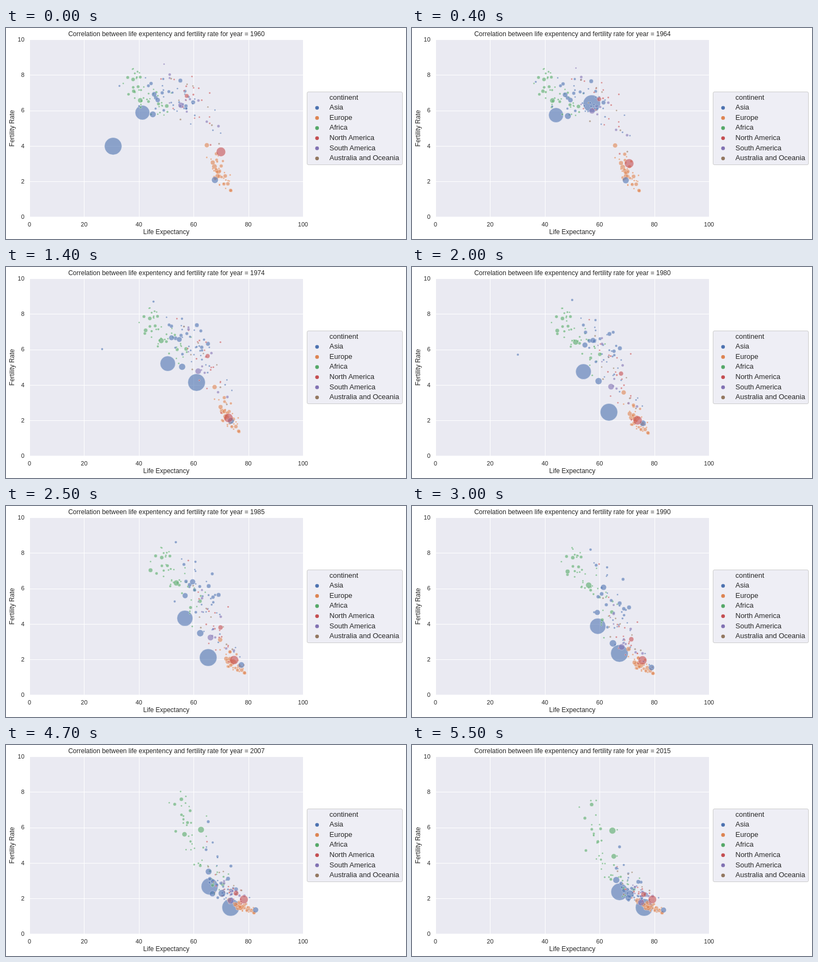
Recreate the animation shown at these times as an HTML page. Size 734x388 px, loop 5600 ms.

```html
<!DOCTYPE html>
<html lang="en">
<head>
<meta charset="utf-8">
<title>Life expectancy and fertility</title>
<style>
  html, body { margin: 0; width: 100%; height: 100%; overflow: hidden; background: #fff; }
  svg { display: block; width: 734px; height: 388px; }
  text { font-family: "Liberation Sans", Arial, sans-serif; fill: #262626; }
</style>
</head>
<body>
<svg id="chart" viewBox="0 0 734 388" xmlns="http://www.w3.org/2000/svg"></svg>
<script>
const chart = document.getElementById('chart');
const YEAR_MS = 100, FIRST = 1960, YEARS = 56;
const COLORS = {
  'Asia': '#4c72b0', 'Europe': '#dd8452', 'Africa': '#55a868',
  'North America': '#c44e52', 'South America': '#8172b3', 'Australia and Oceania': '#937860'
};
const [ASIA, EUROPE, AFRICA, NORTH, SOUTH, OCEANIA] = Object.values(COLORS);

const px = life => 43.5 + 5.02 * life;
const py = fert => 347.6 - 32.6 * fert;

function add(name, attrs, parent = chart) {
  const el = document.createElementNS('http://www.w3.org/2000/svg', name);
  for (const k in attrs) el.setAttribute(k, attrs[k]);
  parent.appendChild(el);
  return el;
}

function label(str, x, y, size, anchor = 'middle', extra = {}) {
  const el = add('text', { x, y, 'font-size': size, 'text-anchor': anchor, ...extra });
  el.textContent = str;
  return el;
}

// Axes
add('rect', { x: 43, y: 21.5, width: 502, height: 326, fill: '#eaeaf2' });
for (let i = 0; i <= 5; i++) {
  const x = px(i * 20), y = py(i * 2);
  const gx = Math.floor(x) + 0.5, gy = Math.floor(y) + 0.5;
  add('path', { d: `M${gx} 21.5V347.5M43 ${gy}H545`, stroke: '#fff' });
  label(i * 20, x - 0.5, 364.5, 11);
  label(i * 2, 33.8, y + 3.3, 11, 'end');
}
label('Life Expectancy', 294.2, 378.8, 12);
label('Fertility Rate', 0, 0, 12, 'middle', { transform: 'translate(15 184.5) rotate(-90)' });
const title = label('', 294.4, 15, 12);

const plot = add('g', { 'fill-opacity': 0.6, stroke: '#fff', 'stroke-width': 0.5, 'stroke-opacity': 0.7 });

// Legend
add('rect', { x: 552.5, y: 117.5, width: 175, height: 134, rx: 2.5, fill: '#eeeef5', stroke: '#ccc' });
label('continent', 593.5, 131.7, 13, 'start');
Object.entries(COLORS).forEach(([name, fill], i) => {
  const y = 146.4 + i * 18.6;
  add('circle', { cx: 570.8, cy: y + 0.4, r: 3.4, fill });
  label(name, 593.5, y + 3.8, 13, 'start');
});

// Each country's life expectancy eases up from life[0] to life[1], while its
// fertility falls along a logistic curve centred on year `mid` after 1960.
// shocks: [year, width, change of life, change of fertility], bell-shaped.
const countries = [];
function country(fill, { r, life, fert, mid, span, ease = 1.3, shocks = [] }) {
  countries.push({ el: add('circle', { fill }, plot), r, life, fert, mid, span, ease, shocks });
}

const mix = (a, b, f) => a + (b - a) * f;
function state({ r, life, fert, mid, span, ease, shocks }, year) {
  const u = year / (YEARS - 1);
  let l = mix(life[0], life[1], 1 - (1 - u) ** ease);
  let f = mix(fert[0], fert[1], 1 / (1 + Math.exp((mid - year) / span)));
  for (const [at, width, dLife, dFert] of shocks) {
    const bell = Math.exp(-(((year - at) / width) ** 2));
    l += dLife * bell;
    f += dFert * bell;
  }
  return { cx: px(l), cy: py(f), r: mix(r[0], r[1], u) };
}

let seed = 1960;
function rand() {
  seed = (seed + 0x6d2b79f5) | 0;
  let t = Math.imul(seed ^ (seed >>> 15), 1 | seed);
  t = (t + Math.imul(t ^ (t >>> 7), 61 | t)) ^ t;
  return ((t ^ (t >>> 14)) >>> 0) / 4294967296;
}
const bell = () => Math.max(-2, Math.min(2, (rand() + rand() + rand() - 1.5) * 2));

// Small countries of a continent; [mean, deviation] pairs. Wealth lengthens
// life, lowers fertility and brings its fall forward.
function group(fill, count, rMax, { life0, life1, fert0, fert1, mid, span }) {
  for (let n = 0; n < count; n++) {
    const wealth = bell(), birth = 0.8 * bell() - 0.6 * wealth;
    const r = 1.6 + (rMax - 1.6) * rand() ** 2.5;
    const at = ([mean, dev], k) => mean + dev * k;
    const scaled = ([mean, dev]) => mean * Math.exp(dev * birth);
    country(fill, {
      r: [r, r], span,
      life: [at(life0, wealth), at(life1, wealth)],
      fert: [scaled(fert0), scaled(fert1)],
      mid: at(mid, 0.7 * bell() - 0.7 * wealth)
    });
  }
}

// China with its famine and later baby boom, then India
country(ASIA, { r: [15.9, 15.9], life: [55.5, 76.2], fert: [6.8, 1.5], mid: 14, span: 4, ease: 1.05,
  shocks: [[0, 1.5, -25, -2.65], [29, 4, 0, 0.8]] });
country(ASIA, { r: [13.3, 15.7], life: [41.2, 67.2], fert: [6.3, 2], mid: 27, span: 12, ease: 1.5 });

group(AFRICA, 46, 3.7, { life0: [43, 4.4], life1: [63.5, 5.5],
  fert0: [6.8, 0.09], fert1: [2.8, 0.2], mid: [48, 13], span: 7 });
group(ASIA, 37, 4, { life0: [54.8, 7.5], life1: [73.9, 4.4],
  fert0: [6.5, 0.11], fert1: [2.1, 0.2], mid: [30, 11], span: 6 });
group(EUROPE, 41, 4.8, { life0: [68.9, 2.6], life1: [78, 2.7],
  fert0: [2.65, 0.22], fert1: [1.55, 0.1], mid: [20, 5], span: 5 });
group(NORTH, 18, 2, { life0: [60, 6], life1: [74.3, 4],
  fert0: [6.7, 0.14], fert1: [2.1, 0.13], mid: [20, 10], span: 7 });
group(SOUTH, 10, 3, { life0: [58, 5.5], life1: [75.3, 2],
  fert0: [6.8, 0.15], fert1: [2.2, 0.1], mid: [18, 7], span: 8 });
group(OCEANIA, 8, 1.9, { life0: [60, 6], life1: [72, 4],
  fert0: [6.7, 0.15], fert1: [2.7, 0.2], mid: [18, 8], span: 8 });

// Cambodia, Yemen, Nigeria, Ethiopia
country(ASIA, { r: [2.1, 2.3], life: [40, 68], fert: [6.3, 2.5], mid: 32, span: 7,
  shocks: [[17, 4.9, -32.6, 0]] });
country(ASIA, { r: [2, 2.9], life: [32.8, 66], fert: [9, 3.2], mid: 41, span: 6, ease: 1.6,
  shocks: [[0, 10, 0, -1.6]] });
country(AFRICA, { r: [4.5, 6], life: [40.4, 64.6], fert: [6.6, 5.8], mid: 30, span: 8,
  shocks: [[9, 1.5, -13.8, -0.1]] });
country(AFRICA, { r: [3.3, 4.7], life: [38, 65.1], fert: [7.1, 3.2], mid: 50, span: 6, ease: 0.6,
  shocks: [[24, 0.8, -10, 0]] });

// Indonesia, Pakistan, Bangladesh, Japan
country(ASIA, { r: [5.8, 6.8], life: [45, 71.1], fert: [5.9, 2.25], mid: 21, span: 6, ease: 1.8 });
country(ASIA, { r: [4.4, 6], life: [46.8, 66], fert: [6.6, 2.9], mid: 39, span: 5, ease: 1.8 });
country(ASIA, { r: [4.6, 5.5], life: [45.5, 70.4], fert: [6.95, 1.95], mid: 31, span: 6, ease: 1 });
country(ASIA, { r: [6, 5], life: [67.7, 83.3], fert: [2.1, 1.35], mid: 24, span: 6, ease: 1.6 });

// Brazil, Mexico, United States
country(SOUTH, { r: [5.3, 6], life: [55.3, 75.1], fert: [7, 1.7], mid: 17, span: 9 });
country(NORTH, { r: [3.9, 4.9], life: [57.4, 76], fert: [7.1, 2.2], mid: 20, span: 7, ease: 1.8 });
country(NORTH, { r: [8.5, 7.5], life: [69.9, 79.2], fert: [5.4, 1.95], mid: 0, span: 5, ease: 1.2 });

let shown = -1;
function draw(ms) {
  const year = Math.floor(ms / YEAR_MS) % YEARS;
  if (year === shown) return;
  shown = year;
  title.textContent = 'Correlation between life expentency and fertility rate for year = ' + (FIRST + year);
  for (const c of countries) {
    const pose = state(c, year);
    for (const k in pose) c.el.setAttribute(k, pose[k].toFixed(2));
  }
}

function tick() {
  draw(performance.now());
  requestAnimationFrame(tick);
}
tick();
</script>
</body>
</html>
```
